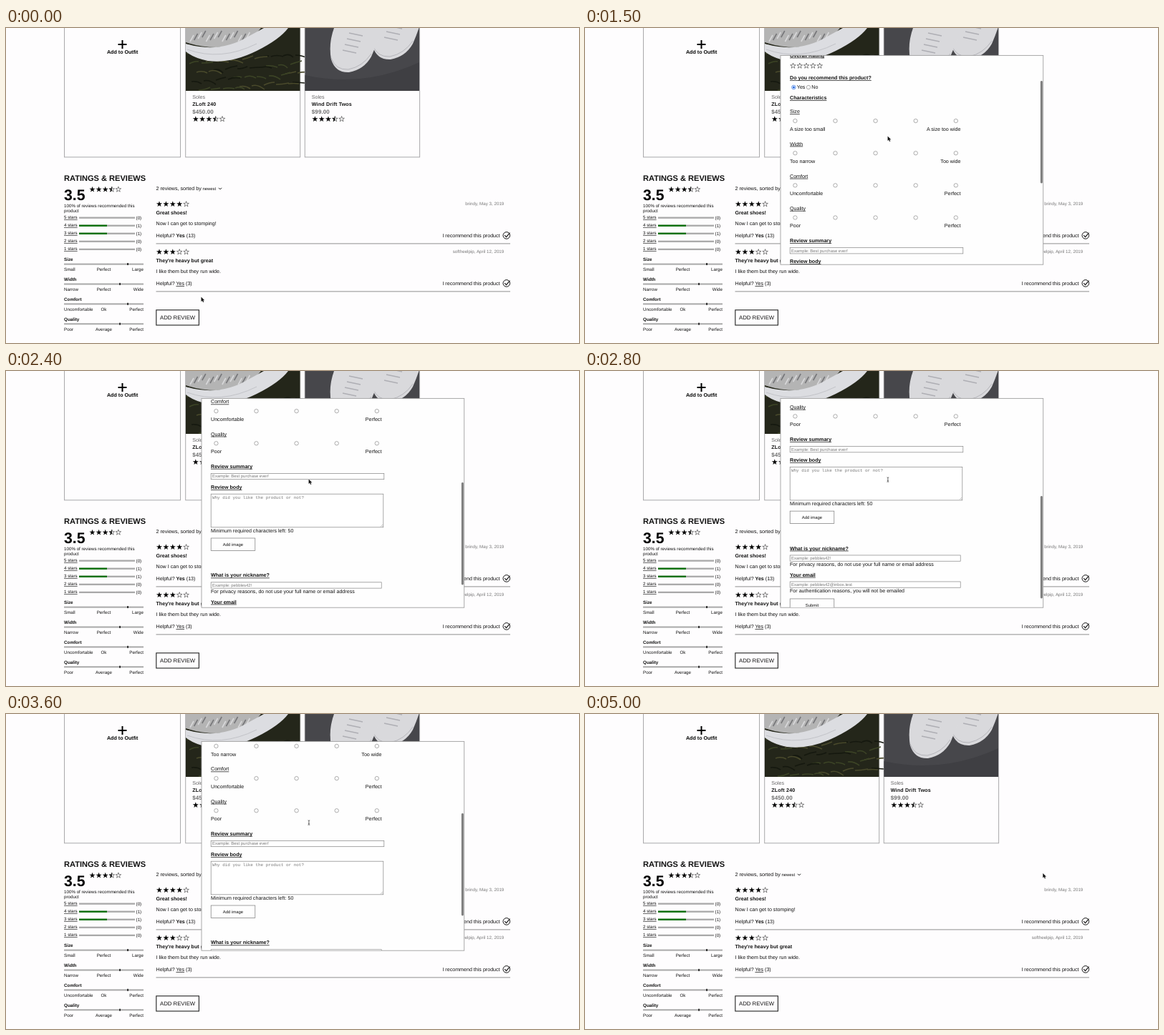
An HTML page for the animation above (5100 ms loop, 800 px wide and 441 px high).

```html
<!DOCTYPE html>
<html lang="en">
<head>
<meta charset="utf-8">
<title>Write a review</title>
<style>
html, body { margin: 0; height: 100%; overflow: hidden; background: #fefdfe; }
svg { display: block; width: 100vw; height: 100vh; }
text { font-family: "Liberation Sans", Arial, sans-serif; text-rendering: geometricPrecision; white-space: pre; }
.b { font-weight: 700; }
.u { text-decoration: underline; }
.mono { font-family: "Liberation Mono", monospace; }
</style>
</head>
<body>
<svg id="stage" viewBox="0 0 800 441" preserveAspectRatio="none"></svg>
<script>
const LOOP = 5100, STEP = 100;
const BASE = 7.11, SMALL = 6.22, FIELD = 5.93;
const INK = '#111', GREY = '#777';

const text = (x, y, s, { size = BASE, cls = '', fill = INK, anchor = 'start', gap = 0 } = {}) =>
  `<text x="${x}" y="${y}" font-size="${size}" class="${cls}" fill="${fill}" text-anchor="${anchor}" letter-spacing="${gap}">${s}</text>`;
const rect = (x, y, w, h, fill, stroke = 'none', sw = 1) =>
  `<rect x="${x}" y="${y}" width="${w}" height="${h}" fill="${fill}" stroke="${stroke}" stroke-width="${sw}"/>`;
const circle = (x, y, r, fill, stroke = 'none', sw = 1) =>
  `<circle cx="${x}" cy="${y}" r="${r}" fill="${fill}" stroke="${stroke}" stroke-width="${sw}"/>`;
const path = (d, fill = 'none', stroke = 'none', sw = 1, more = '') =>
  `<path d="${d}" fill="${fill}" stroke="${stroke}" stroke-width="${sw}" ${more}/>`;

function starPath(x, y, r, points = 10) {
  let d = '';
  for (let i = 0; i <= points; i++) {
    const a = -Math.PI / 2 - i * Math.PI / 5, q = i % 2 ? r * 0.39 : r;
    d += `${i ? 'L' : 'M'}${(x + q * Math.cos(a)).toFixed(2)} ${(y + q * Math.sin(a)).toFixed(2)}`;
  }
  return d + 'Z';
}

function stars(x, y, score, gap = 9.3, r = 4.3) {
  let s = '';
  for (let i = 0; i < 5; i++) {
    const cx = x + i * gap, part = score - i;
    if (part >= 1) { s += path(starPath(cx, y, r), '#000'); continue; }
    s += path(starPath(cx, y, r - 0.3), 'none', '#222', 0.55);
    if (part > 0) s += path(starPath(cx, y, r, 5), '#000');
  }
  return s;
}

function fernPhoto() {
  let s = rect(251, 0, 159.5, 88, '#24261a');
  for (let i = 0; i < 44; i++) {
    const x = 252 + (i * 37) % 158, y = 36 + (i * 23) % 52;
    s += path(`M${x} ${y}q8 ${-4 + i % 5} ${13 + i % 6} ${5 - i % 11}`, 'none', ['#3c4426', '#15180f', '#4a4a2c'][i % 3], 1.6);
  }
  s += path('M251 0H356L342 16Q300 36 251 20Z', '#b4b4b4');
  for (let i = 0; i < 15; i++)
    s += path(`M${257 + i * 5.6} ${19 - i % 4 * 2}l5 -9`, 'none', i % 2 ? '#77777a' : '#d8d8da', 1.6);
  return s + path('M251 22Q298 36 338 12L360 0H394Q382 16 350 32Q314 50 282 46Q262 42 251 33Z', '#dcdde1')
    + path('M253 30Q300 47 350 22', 'none', '#c2c3c8', 1);
}

function sneakerPhoto() {
  let s = rect(417.5, 0, 159.5, 88, '#47474b') + path('M417.5 66Q500 84 577 48V88H417.5Z', '#3f3f43');
  const shoe = (dx, dy) => {
    let q = path('M458 0Q450 22 454 44Q460 63 479 62Q500 58 510 40Q518 22 524 0Z', '#d9d9dc')
      + path('M454 42Q460 59 478 58Q498 54 510 36', 'none', '#b5b5ba', 1);
    for (let i = 0; i < 4; i++) q += path(`M${470 + i * 3} ${31 - i * 8}l19 4`, 'none', '#aeaeb4', 1.3);
    return `<g transform="translate(${dx} ${dy})">${q}</g>`;
  };
  return s + shoe(58, -18) + shoe(0, 0);
}

function card(x, w, name, price, photo) {
  let s = rect(x, -10, w, 190.8, '#fefdfe', '#a9a9ab');
  if (!name) return s;
  const tx = x + 9.5;
  return s + photo + text(tx, 99, 'Soles', { fill: '#666' })
    + text(tx, 109, name, { cls: 'b', gap: 0.18 })
    + text(tx, 120.3, price, { size: 8, cls: 'b', fill: '#707070', gap: 0.1 })
    + stars(tx + 4.6, 127.5, 3.5);
}

function summary() {
  let s = text(81, 213.6, 'RATINGS &amp; REVIEWS', { size: 11.07, cls: 'b' })
    + text(81, 240.6, '3.5', { size: 21.2, cls: 'b', fill: '#000' })
    + stars(120.5, 226, 3.5, 9.1)
    + text(81, 250.8, '100% of reviews recommended this', { size: SMALL })
    + text(81, 257.8, 'product', { size: SMALL });
  [0, 1, 1, 0, 0].forEach((n, i) => {
    const y = 265.6 + i * 11.05;
    s += text(81, y + 1.6, `${5 - i} stars`, { size: SMALL, cls: 'u' })
      + rect(102, y - 1.1, 78, 2.3, '#a9a9a9') + (n ? rect(102, y - 1.1, 39, 2.3, '#087008') : '')
      + text(181.6, y + 2.4, `(${n})`, { size: SMALL });
  });
  [['Size', 170, 'Small', 'Perfect', 'Large'], ['Width', 159, 'Narrow', 'Perfect', 'Wide'],
   ['Comfort', 170, 'Uncomfortable', 'Ok', 'Perfect'], ['Quality', 159, 'Poor', 'Average', 'Perfect']]
  .forEach(([name, mark, low, mid, high], i) => {
    const y = 330.6 + i * 27.9;
    s += text(81, y - 4.5, name, { size: 6.3, cls: 'b' })
      + rect(81, y - 1, 111, 2, '#a9a9a9') + rect(mark - 0.7, y - 1.6, 1.5, 3, '#000')
      + text(81, y + 9.2, low, { size: SMALL })
      + text(136.5, y + 9.2, mid, { size: SMALL, anchor: 'middle' })
      + text(192, y + 9.2, high, { size: SMALL, anchor: 'end' });
  });
  return s;
}

function review(y, score, by, title, body, yes, votes) {
  return stars(214, y, score, 9.4)
    + text(695.3, y + 0.9, by, { size: SMALL, fill: GREY, anchor: 'end' })
    + text(209.5, y + 14.8, title, { cls: 'b' })
    + text(209.5, y + 29.8, body)
    + text(209.5, y + 46.6, `Helpful? <tspan class="${yes}">Yes</tspan> (${votes})`)
    + text(689.6, y + 46.6, 'I recommend this product', { anchor: 'end' })
    + circle(698.8, y + 43.8, 4.8, 'none', INK, 1)
    + path(`M696.2 ${y + 43.6}l2.3 2.5 5 -6`, 'none', INK, 1.1)
    + rect(209.5, y + 54.8, 494.5, 1, '#8f8f8f');
}

const page = () => card(81.5, 162)
  + path('M162.5 17V29M156.5 23H168.5', 'none', '#000', 2)
  + text(162.7, 36.3, 'Add to Outfit', { cls: 'b', anchor: 'middle', fill: '#000' })
  + card(250.7, 160, 'ZLoft 240', '$450.00', fernPhoto())
  + card(417.3, 160.3, 'Wind Drift Twos', '$99.00', sneakerPhoto())
  + summary()
  + text(209.5, 227, '2 reviews, sorted by')
  + text(274.4, 226.8, 'newest', { size: FIELD })
  + path('M297 223.8l2 2 2 -2', 'none', INK, 1)
  + review(246.6, 4, 'brindy, May 3, 2019', 'Great shoes!', 'Now I can get to stomping!', 'b', 13)
  + review(313.6, 3, 'softheelpip, April 12, 2019', 'They\'re heavy but great', 'I like them but they run wide.', 'u', 3);

const field = (y, w, hint) => rect(286.2, y, w, 8.3, '#fff', '#858585', 0.7)
  + text(288, y + 6.1, hint, { size: FIELD, fill: GREY });
const button = (y, label) => rect(286.2, y, 61.6, 17.4, '#fefefe', '#777', 0.7)
  + text(317, y + 10.7, label, { size: FIELD, anchor: 'middle' });
const heading = (y, s) => text(286, y, s, { cls: 'b u' });
const radio = (x, y) => circle(x, y, 2.7, '#fff', '#777', 0.6);

function form() {
  let s = text(286, 75, 'Write Your Review', { size: 14.1, cls: 'b' })
    + circle(617.4, 60.8, 6, 'none', INK, 0.9)
    + path('M615.2 58.6l4.4 4.4m0 -4.4l-4.4 4.4', 'none', INK, 0.9)
    + text(286, 93.5, 'About the Wind Drift Twos', { cls: 'b' })
    + heading(110.6, 'Overall Rating') + stars(290.5, 123, 0)
    + heading(142, 'Do you recommend this product?')
    + circle(291.4, 153, 2.8, '#fff', '#2b6de0', 0.7) + circle(291.4, 153, 1.6, '#2b6de0')
    + text(295.8, 155.3, 'Yes') + radio(312, 153) + text(316.3, 155.3, 'No')
    + heading(170, 'Characteristics');
  [['Size', 'A size too small', 'A size too wide'], ['Width', 'Too narrow', 'Too wide'],
   ['Comfort', 'Uncomfortable', 'Perfect'], ['Quality', 'Poor', 'Perfect']]
  .forEach(([name, low, high], i) => {
    const y = 200 + i * 45.15;
    s += text(286, y - 10.6, name, { cls: 'u' });
    for (let k = 0; k < 5; k++) s += radio(293.4 + k * 56.1, y);
    s += text(286, y + 13.6, low) + text(524.4, y + 13.6, high, { anchor: 'end' });
  });
  return s + heading(370, 'Review summary') + field(377.6, 241.6, 'Example: Best purchase ever!')
    + heading(399.2, 'Review body') + rect(286.2, 406.4, 240.6, 46.6, '#fff', '#858585', 0.7)
    + text(288, 413.2, 'Why did you like the product or not?', { size: FIELD, cls: 'mono', fill: GREY })
    + path('M523 452l3 -3M525 452l1 -1', 'none', '#888', 0.5)
    + text(286, 459.8, 'Minimum required characters left: 50') + button(468.2, 'Add image')
    + heading(522.7, 'What is your nickname?') + field(530, 238, 'Example: pebbles42!')
    + text(286, 545.2, 'For privacy reasons, do not use your full name or email address')
    + heading(559.8, 'Your email') + field(567, 238, 'Example: pebbles42@inbox.test')
    + text(286, 582.3, 'For authentication reasons, you will not be emailed') + button(591, 'Submit');
}

const cursors = {
  arrow: path('M0 0V6.4L1.5 5.1 2.6 7.5 3.7 7 2.7 4.7H4.7Z', '#111', '#fff', 0.5, 'paint-order="stroke"'),
  hand: path('M-.7 .6Q0 -.3 .7 .6V3L4.3 3.7Q5.2 4 5 5.2L4.2 8H.2L-2 5Q-2 3.9 -.7 4.8Z', '#fff', '#111', 0.6),
  beam: path('M-1 0Q.3 0 .3 1V5.6Q.3 6.6 -1 6.6M1.6 0Q.3 0 .3 1M.3 5.6Q.3 6.6 1.6 6.6M-.5 4.5H1.1', 'none', '#333', 0.7)
};

document.getElementById('stage').innerHTML = `
<defs><clipPath id="clip">${rect(273.4, 38.8, 366, 292.2, '#000')}</clipPath></defs>
${page()}
<g id="add">${rect(209.8, 394.8, 59.6, 21.2, '#fefdfe', '#222', 1.1)}${text(239.6, 408, 'ADD REVIEW', { size: 7.75, anchor: 'middle' })}</g>
<g id="modal">${rect(273, 38.4, 366.7, 292.8, '#fefefe', '#a0a0a0', 0.9)}
<g clip-path="url(#clip)"><g id="form">${form()}</g></g>
<rect id="thumb" x="635.9" width="2.9" height="143.4" rx="1.4" fill="#7b7b7b"/></g>
<g id="cursor">${Object.entries(cursors).map(([k, v]) => `<g id="${k}">${v}</g>`).join('')}</g>`;

const el = id => document.getElementById(id);
const show = (id, on) => el(id).setAttribute('display', on ? 'inline' : 'none');
const [addBox, addText] = el('add').children;

// Each key is [time, ...values]
const scrollKeys = [[1200, 0], [1300, 14], [1500, 70], [1900, 151.4], [2400, 234.2], [3000, 291],
  [3100, 297.2], [3200, 297.2], [3600, 200.2], [3900, 70], [4100, 0]];
const cursorKeys = [[0, 272.5, 376.6], [300, 245, 401], [400, 241.8, 402.6], [600, 241.8, 402.6],
  [700, 258, 382], [1000, 370, 210], [1200, 409, 158], [1300, 422.6, 151.5], [2500, 422.6, 151.5],
  [2600, 422.6, 148.8], [3800, 422.6, 148.8], [4000, 560, 85], [4200, 617.5, 57.5], [4500, 617.5, 57.5],
  [4700, 622, 92], [5000, 639.3, 223]];

function sample(keys, t) {
  let i = keys.findIndex(k => k[0] > t);
  if (i < 0) return keys[keys.length - 1].slice(1);
  if (i === 0) return keys[0].slice(1);
  const a = keys[i - 1], b = keys[i], p = (t - a[0]) / (b[0] - a[0]);
  return a.slice(1).map((v, k) => v + (b[k + 1] - v) * p);
}

function draw(now) {
  const t = Math.floor(now % LOOP / STEP) * STEP;
  const [scroll] = sample(scrollKeys, t), [x, y] = sample(cursorKeys, t);
  const hover = t >= 300 && t < 700;
  const kind = hover || (t >= 4400 && t < 4600) ? 'hand' : t >= 2600 && t < 3900 ? 'beam' : 'arrow';
  addBox.setAttribute('fill', hover ? '#000' : '#fefdfe');
  addText.setAttribute('fill', hover ? '#fff' : INK);
  show('modal', t >= 500 && t < 4600);
  show('thumb', t >= 1300 && t < 4200);
  el('form').setAttribute('transform', `translate(0 ${-scroll})`);
  el('thumb').setAttribute('y', 39 + scroll * 0.5);
  el('cursor').setAttribute('transform', `translate(${x} ${y})`);
  for (const k in cursors) show(k, k === kind);
}

let start;
function tick(now) {
  start ??= now;
  draw(now - start);
  requestAnimationFrame(tick);
}
draw(0);
requestAnimationFrame(tick);
</script>
</body>
</html>
```
